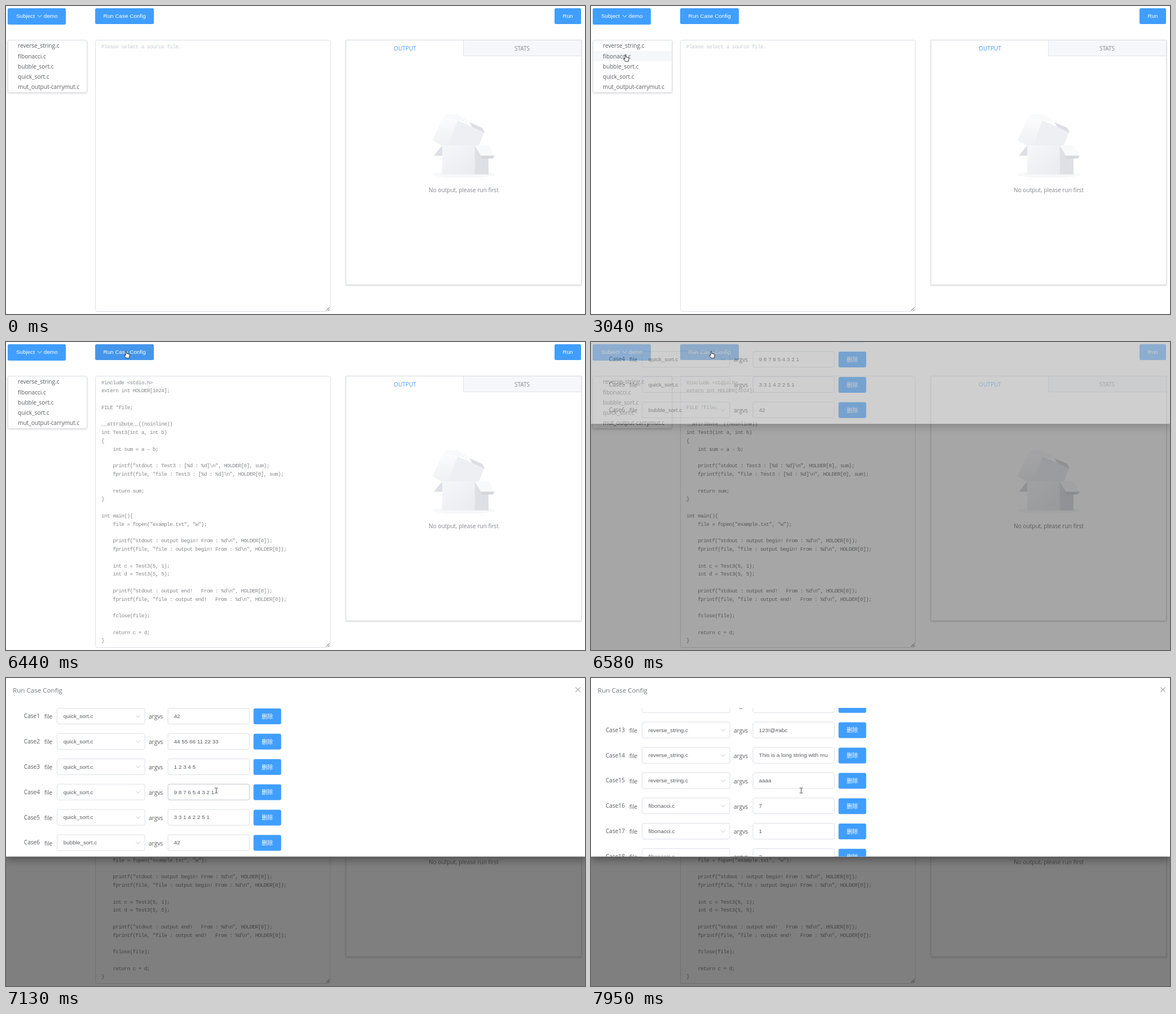
These frames come from a looping animation (1026x546 px, 8000 ms). An HTML page:

```html
<!DOCTYPE html>
<html lang="en">
<head>
<meta charset="utf-8">
<title>Run Case Config</title>
<style>
  html, body { margin: 0; width: 100%; height: 100%; overflow: hidden; background: #fff; }
  svg { display: block; width: 1026px; height: 546px; }
  text { white-space: pre; fill: #5a5c60; }
  .ui { font: 10.1px "Open Sans", "Noto Sans", sans-serif; }
  .title { font: 11.6px "Open Sans", "Noto Sans", sans-serif; fill: #72767b; }
  .arial { font: 9.9px "Liberation Sans", Arial, sans-serif; }
  .cjk { font: 10.1px "Noto Sans CJK SC", "Noto Sans CJK", sans-serif; }
  .code { font: 9.4px "Liberation Mono", monospace; letter-spacing: -.58px; fill: #85878b; }
  .white { fill: #fff; }
  .grey { fill: #84878c; }
  .pale { fill: #c8cbd1; }
  .blue { fill: #409eff; }
  .mid { text-anchor: middle; }
  .end { text-anchor: end; }
  .card { fill: #fff; stroke: #dcdfe6; filter: drop-shadow(0 1.4px 1.6px rgba(0,0,0,.17)); }
  .field { fill: #fff; stroke: #dcdfe6; }
  .line { fill: none; stroke: #c0c4cc; }
  #sheet { fill: #fff; filter: drop-shadow(0 5px 8px rgba(0,0,0,.4)); }
</style>
</head>
<body>
<svg id="stage" viewBox="0 0 1026 546" xmlns="http://www.w3.org/2000/svg"></svg>
<script>
const LOOP = 8000;
const ROW = 44.85, LIST_ROW = 18.25, CODE_ROW = 14.77;

const files = ['reverse_string.c', 'fibonacci.c', 'bubble_sort.c', 'quick_sort.c', 'mut_output-carrymut.c'];
const [REV, FIB, BUB, QUICK] = files;

const source = String.raw`#include <stdio.h>
extern int HOLDER[1024];

FILE *file;

__attribute__((noinline))
int Test3(int a, int b)
{
    int sum = a - b;

    printf("stdout : Test3 : [%d : %d]\n", HOLDER[0], sum);
    fprintf(file, "file : Test3 : [%d : %d]\n", HOLDER[0], sum);

    return sum;
}

int main(){
    file = fopen("example.txt", "w");

    printf("stdout : output begin! From : %d\n", HOLDER[0]);
    fprintf(file, "file : output begin! From : %d\n", HOLDER[0]);

    int c = Test3(5, 1);
    int d = Test3(5, 5);

    printf("stdout : output end!   From : %d\n", HOLDER[0]);
    fprintf(file, "file : output end!   From : %d\n", HOLDER[0]);

    fclose(file);

    return c + d;
}`;

const numbers = ['42', '44 55 66 11 22 33', '1 2 3 4 5', '9 8 7 6 5 4 3 2 1', '3 3 1 4 2 2 5 1'];
const cases = [
  ...numbers.map(a => [QUICK, a]),
  ...numbers.map(a => [BUB, a]),
  ...['hello', 'a', '123!@#abc', 'This is a long string with multiple words', 'aaaa'].map(a => [REV, a]),
  ...['7', '1', '2'].map(a => [FIB, a])
];

// Markup helpers
const esc = s => s.replace(/&/g, '&amp;').replace(/</g, '&lt;');
const text = (x, y, cls, s) => `<text x="${x}" y="${y}" class="${cls}">${esc(s)}</text>`;
const rect = (x, y, w, h, attrs) => `<rect x="${x}" y="${y}" width="${w}" height="${h}" ${attrs}/>`;
const path = (d, attrs) => `<path d="${d}" ${attrs}/>`;
const button = (id, x, y, w, h) => rect(x, y, w, h, `id="${id}" rx="2.5" class="blue"`);

function toolbar() {
  return button('subject', 3, 4, 103, 29) + text(18, 21, 'arial white', 'Subject')
    + path('M56 16l3.7 3.7l3.7 -3.7', 'fill="none" stroke="#fff"')
    + text(66.8, 21, 'arial white', 'demo')
    + button('config', 158, 4, 104, 28) + text(172.5, 21, 'arial white', 'Run Case Config')
    + button('run', 972, 4, 47, 28) + text(986.5, 21, 'arial white', 'Run');
}

function fileList() {
  return rect(3.5, 60.8, 140, 92.5, 'rx="2" class="card"')
    + rect(4, 0, 139, 18.2, 'id="hover" fill="#f5f7fa"')
    + files.map((f, i) => text(21, 74.3 + LIST_ROW * i, 'ui', f)).join('');
}

function editor() {
  const lines = source.split('\n').map((s, i) => text(169, 74.6 + CODE_ROW * i, 'code', s)).join('');
  return rect(158.5, 60.5, 416, 481, 'id="area" rx="3" class="field"')
    + text(169, 74.6, 'code pale', 'Please select a source file.').replace('<text', '<text id="hint"')
    + `<g id="lines">${lines}</g>`
    + path('M567.5 540l5.5 -5.5M571 540l2 -2', 'fill="none" stroke="#444"');
}

function emptyBox() {
  return '<ellipse cx="811" cy="299" rx="56" ry="5.5" fill="#f7f8fa"/>'
    + path('M774 197L783 191.5L801 192.5L824 207L801 204Z', 'fill="#f8f9fb"')
    + path('M774 197L800 203L783 247.5H773L756 238.5Z', 'fill="url(#side)"')
    + path('M800 203L848 221L838 247.5H783Z', 'fill="#eeeff3"')
    + path('M800 203L821 205L826 214Z', 'fill="#fff"')
    + path('M821 206L844 216L848 225L826 214Z', 'fill="#dedfe4"')
    + path('M773 247L758 265.5H773Z', 'fill="#dedfe4"')
    + rect(773, 247, 57.5, 51.5, 'fill="url(#front)"')
    + rect(830.5, 247, 24.5, 51.5, 'fill="#dfe0e5"')
    + path('M841 265H866L863 270L842 271Z', 'fill="#d5d6dc"')
    + path('M830.5 247H855.5L866 265.5H841.5Z', 'fill="#f8f9fb"');
}

function output() {
  return rect(602.5, 60.5, 417, 433.5, 'class="card"')
    + rect(810.5, 61, 208.5, 27, 'fill="#f5f7fa"')
    + path('M810.5 61V88.5H1019', 'fill="none" stroke="#dfe3ea"')
    + text(707, 78.6, 'ui mid blue', 'OUTPUT')
    + text(914.5, 78.6, 'ui mid grey', 'STATS')
    + emptyBox()
    + text(811, 330.3, 'ui mid grey', 'No output, please run first');
}

function caseRow([file, args], i) {
  const y = 67.6 + ROW * i;
  return text(60, y + 3.6, 'ui end', 'Case' + (i + 1))
    + text(68, y + 4.8, 'ui', 'file')
    + rect(90.5, y - 14, 155.5, 28, 'rx="3" class="field"')
    + text(101.8, y + 3.4, 'arial', file)
    + path(`M230.3 ${y - 1.7}l3.7 3.7l3.7 -3.7`, 'class="line"')
    + text(253, y + 4.8, 'ui', 'argvs')
    + rect(287, y - 14, 144.3, 28, `id="args${i + 1}" rx="3" class="field"`)
    + `<g clip-path="url(#argClip)">${text(297.6, y + 3.4, 'arial', args)}</g>`
    + rect(438.6, y - 13.6, 49, 28, 'rx="3" class="blue"')
    + text(463, y + 4.2, 'cjk white mid', '删除');
}

function drawer() {
  return rect(0, 0, 1026, 546, 'id="mask"')
    + `<g id="drawer">${rect(0, -6, 1026, 322.6, 'id="sheet"')}`
    + text(12, 25.6, 'title', 'Run Case Config')
    + path('M1009.3 16.5l8.4 8.4M1017.7 16.5l-8.4 8.4', 'fill="none" stroke="#72767b"')
    + `<g clip-path="url(#bodyClip)"><g id="rows">${cases.map(caseRow).join('')}</g></g></g>`;
}

const skin = 'fill="#fff" stroke="#222" stroke-width=".9" stroke-linejoin="round"';
function pointers() {
  return `<g id="pointer">`
    + path('M0 0V11L2.5 8.7L4.2 12.5L6 11.7L4.3 8H7.7Z', 'id="arrow" ' + skin)
    + path('M-.9 .9Q0 -.3 .9 .9V4.5L5.2 5.4Q6.3 5.8 6.2 7L5.4 12.3H-.2L-3.4 8Q-3.3 6.6 -.9 8Z', 'id="hand" ' + skin)
    + path('M-2.8 -4.5H-.6L0 -4L.6 -4.5H2.8M0 -4V4M-2.8 4.5H-.6L0 4L.6 4.5H2.8', 'id="beam" fill="none" stroke="#333" stroke-width=".9"')
    + '</g>';
}

document.getElementById('stage').innerHTML = `<defs>
  <linearGradient id="side" x1="0" y1="0" x2="0" y2="1"><stop stop-color="#fcfcfd"/><stop offset="1" stop-color="#eff0f4"/></linearGradient>
  <linearGradient id="front" x1="0" y1="0" x2="1" y2="1"><stop stop-color="#f6f7f9"/><stop offset="1" stop-color="#e9ebef"/></linearGradient>
  <clipPath id="bodyClip">${rect(0, 53, 1026, 263.6, '')}</clipPath>
  <clipPath id="argClip">${rect(297, 0, 123, 1000, '')}</clipPath>
</defs>` + toolbar() + fileList() + editor() + output() + drawer() + pointers();

// Motion: [start, end, steps, points]
const moves = [
  [490, 1050, 8, [[964, 524], [643, 288]]],
  [1250, 1320, 2, [[560, 246], [484, 207]]],
  [1470, 2220, 12, [[450, 195], [110, 112], [89, 45]]],
  [2280, 2350, 2, [[89, 42], [88, 40]]],
  [2680, 3040, 6, [[84, 32], [72, 18], [61, 86]]],
  [3230, 3850, 9, [[63, 90], [100, 118], [70, 141]]],
  [4870, 5150, 5, [[92, 132], [277, 53]]],
  [5290, 5350, 2, [[277, 52], [276, 52]]],
  [5680, 6440, 12, [[290, 50], [374, 42], [300, 30], [213, 16]]],
  [6640, 6850, 4, [[262, 72], [372.5, 199.5]]]
];
const scrolls = [
  [7130, 7480, 6, [[0], [257]]],
  [7620, 7950, 6, [[275], [513.6]]]
];

const clamp = v => Math.max(0, Math.min(1, v));

function stepped(t, a, b, n) {
  return clamp(Math.floor((t - a) / (b - a) * (n - 1) + 1e-6) / (n - 1));
}

function along(points, p) {
  const s = p * (points.length - 1);
  const i = Math.min(Math.floor(s), points.length - 2);
  return points[i].map((v, k) => v + (points[i + 1][k] - v) * (s - i));
}

function track(table, t) {
  const seg = table.filter(s => s[0] <= t).pop();
  return seg && along(seg[3], stepped(t, seg[0], seg[1], seg[2]));
}

// The CSS "ease" curve
function ease(x) {
  x = clamp(x);
  let lo = 0, hi = 1;
  for (let i = 0; i < 24; i++) {
    const u = (lo + hi) / 2, v = 1 - u;
    if (.75 * v * v * u + .75 * v * u * u + u ** 3 < x) lo = u; else hi = u;
  }
  return .3 * lo * (1 - lo) ** 2 + 3 * (1 - lo) * lo * lo + lo ** 3;
}

const el = id => document.getElementById(id);
const show = (id, on) => { el(id).style.display = on ? '' : 'none'; };
const paint = (id, prop, value) => { el(id).style[prop] = value; };
const move = (id, x, y) => el(id).setAttribute('transform', `translate(${x} ${y})`);

function draw(t) {
  const open = t >= 6500, loaded = t >= 4190;
  const at = track(moves, t);
  const [x, y] = at || [-99, -99];
  const within = (l, top, r, b) => x >= l && x <= r && y >= top && y <= b;

  const onSubject = within(3, 4, 106, 32), onConfig = within(158, 4, 262, 32);
  const onList = within(4, 61, 143, 153), onArea = within(158, 60, 574, 541);

  paint('subject', 'fill', onSubject ? '#66b1ff' : '');
  paint('config', 'fill', t >= 6440 ? '#4496ec' : onConfig ? '#66b1ff' : '');
  show('hover', onList);
  if (onList) el('hover').setAttribute('y', 61.4 + LIST_ROW * Math.floor((y - 61.4) / LIST_ROW));
  paint('area', 'stroke', onArea && t >= 1470 && !open ? '#c0c4cc' : '');
  show('hint', !loaded);
  show('lines', loaded);

  show('mask', open);
  show('drawer', open);
  if (open) {
    const since = 6500 + 350 * stepped(t, 6500, 6850, 6) - 6488;
    const slide = ease(since / 300);
    paint('mask', 'opacity', .5 * ease(since / 200));
    paint('drawer', 'opacity', slide);
    move('drawer', 0, -317 * (1 - slide));
    move('rows', 0, -(track(scrolls, t) || [0])[0]);
    paint('args4', 'stroke', t >= 6850 && t < 7190 ? '#c0c4cc' : '');
  }

  const hand = onSubject || onConfig || onList && !open;
  const beam = open ? t >= 6850 : onArea;
  show('pointer', at);
  show('hand', hand);
  show('beam', beam && !hand);
  show('arrow', !hand && !beam);
  move('pointer', x, y);
}

const begin = performance.now();
function tick() {
  draw((performance.now() - begin) % LOOP);
  requestAnimationFrame(tick);
}
tick();
</script>
</body>
</html>
```
